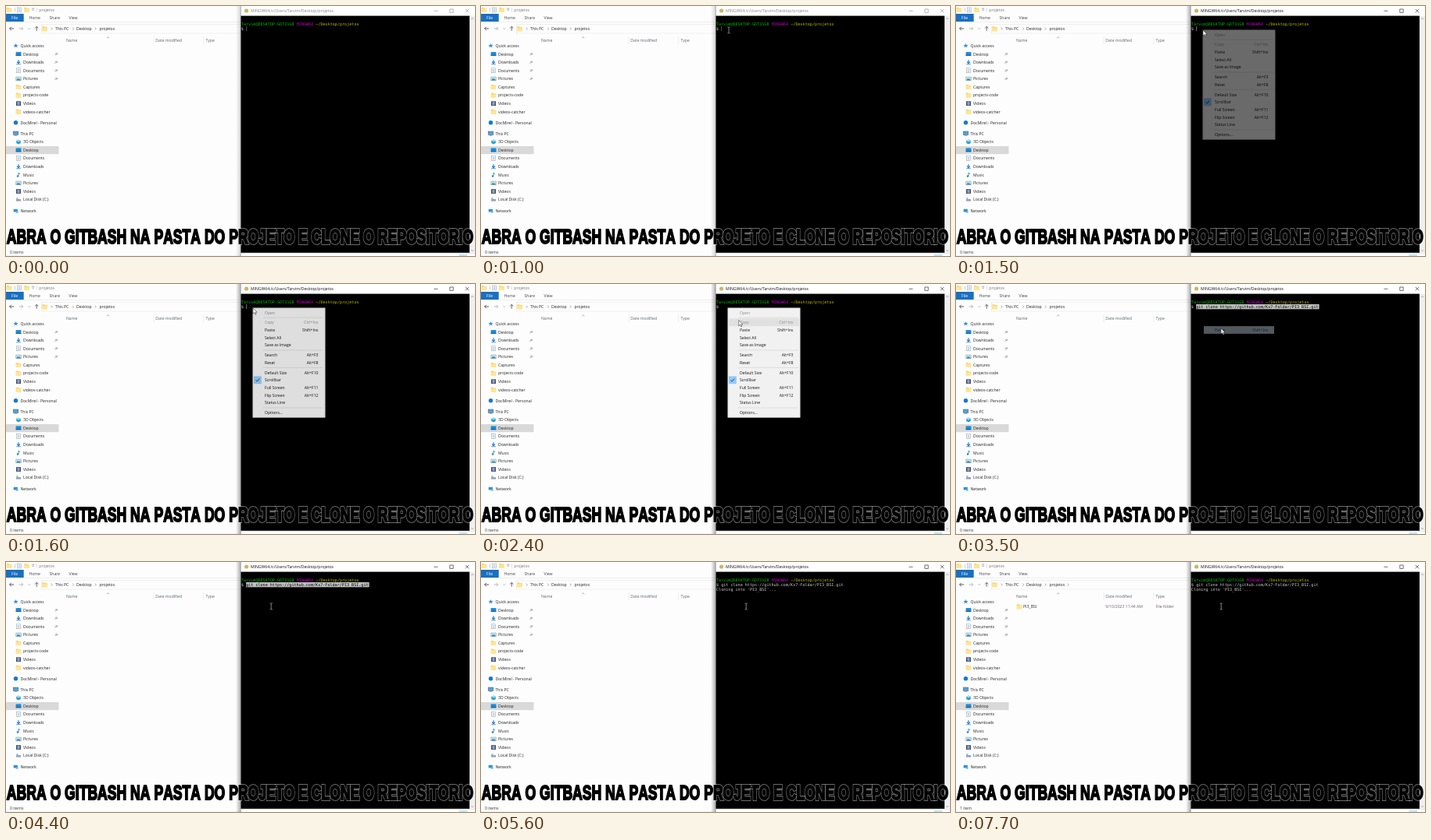
Recreate the animation shown at these times as an HTML page. Size 600 by 321 pixels, loop 8 s.

```html
<!DOCTYPE html>
<html lang="pt">
<head>
<meta charset="utf-8">
<title>Clone do repositorio</title>
<style>
html, body { margin: 0; width: 100%; height: 100%; overflow: hidden; background: #fff; }
svg { display: block; width: 100vw; height: 100vh; }
text { font: 5.1px "Open Sans", "Noto Sans", sans-serif; fill: #222; white-space: pre; }
.term text { font: 5.108px "DejaVu Sans Mono", "Liberation Mono", monospace; fill: #ccc; }
.caption text {
  font: bold 26.5px "Liberation Sans", Arial, sans-serif; font-kerning: none; fill: #000;
  vector-effect: non-scaling-stroke;
}
</style>
</head>
<body>
<svg id="stage" viewBox="0 0 600 321" preserveAspectRatio="none" xmlns="http://www.w3.org/2000/svg"></svg>
<script>
const LOOP = 8000;
const USER = 'Tarvim';
const COMMAND = 'git clone https://github.com/Kx7-Foldar/PI3_BSI.git';
const COL = 3.075, ROW = 6.15, TERM_X = 301, TERM_Y = 24.6;

const rect = (x, y, w, h, fill, more = '') =>
  `<rect x="${x}" y="${y}" width="${w}" height="${h}" fill="${fill}" ${more}/>`;
const line = (d, color = '#555', w = 0.7, more = '') =>
  `<path d="${d}" fill="none" stroke="${color}" stroke-width="${w}" ${more}/>`;
const shape = (d, fill) => `<path d="${d}" fill="${fill}"/>`;
const dot = (x, y, r, fill) => `<circle cx="${x}" cy="${y}" r="${r}" fill="${fill}"/>`;
// Text centred vertically on y
const label = (x, y, s, fill = '#222', more = '') =>
  `<text x="${x}" y="${y + 1.8}" style="fill:${fill}" ${more}>${s}</text>`;
const group = (id, body) => `<g id="${id}">${body}</g>`;

const chevron = (x, y) => line(`M${x - 0.8} ${y - 1.6}l1.6 1.6l-1.6 1.6`, '#777', 0.6);

// Small icons, centred on x, y
const icons = {
  folder: (x, y) => shape(`M${x - 3.2} ${y - 3}h2.6l.8 .9h3v5.1h-6.4z`, '#f7d36b') +
    rect(x - 3.2, y - 1.4, 6.4, 4.4, '#ffe594'),
  star: (x, y) => shape(`M${x} ${y - 3}l.9 2h2.2l-1.7 1.4l.7 2.2l-2.1-1.3l-2.1 1.3l.7-2.2l-1.7-1.4h2.2z`, '#3c8fdc'),
  desk: (x, y) => rect(x - 3.4, y - 2.6, 6.8, 4.8, '#1a8bd8') + rect(x - 3.4, y + 1.2, 6.8, 1, '#0b5d9e'),
  down: (x, y) => line(`M${x} ${y - 3}v4.4m-2-2l2 2l2-2`, '#1f7fd0', 1.2) + rect(x - 2.8, y + 2.2, 5.6, 0.8, '#1f7fd0'),
  doc: (x, y) => rect(x - 2.3, y - 3, 4.6, 6, '#fff', 'stroke="#8a98a5" stroke-width=".5"') +
    line(`M${x - 1.3} ${y - 1.2}h2.6m-2.6 1.3h2.6m-2.6 1.3h2.6`, '#5a94c4', 0.5),
  pic: (x, y) => rect(x - 3.2, y - 2.4, 6.4, 4.8, '#bfe2f7', 'stroke="#8a98a5" stroke-width=".5"') +
    shape(`M${x - 2.8} ${y + 2}l2-2.6l1.4 1.2l.9-.8l1.4 2.2z`, '#3c8b9b'),
  film: (x, y) => rect(x - 3, y - 2.9, 6, 5.8, '#4b4858') + rect(x - 1.6, y - 2.2, 3.2, 4.4, '#7fa7d8'),
  mark: (x, y) => dot(x, y, 2.7, '#1479cf'),
  pc: (x, y) => rect(x - 3.3, y - 2.7, 6.6, 4.4, '#4da5dc', 'stroke="#555" stroke-width=".5"') +
    rect(x - 1.7, y + 2.1, 3.4, 0.7, '#666'),
  cube: (x, y) => shape(`M${x} ${y - 3}l2.8 1.5v3l-2.8 1.5l-2.8-1.5v-3z`, '#2a9fd0') +
    shape(`M${x} ${y - 3}l2.8 1.5l-2.8 1.5l-2.8-1.5z`, '#9adfec'),
  note: (x, y) => line(`M${x} ${y + 1.6}v-4.4q.4 1.4 2 1.8`, '#1f7fd0', 0.8) + dot(x - 1, y + 1.7, 1.2, '#1f7fd0'),
  disk: (x, y) => rect(x - 3, y - 0.6, 6, 2.6, '#9aa3ab') + rect(x - 2.6, y - 2.2, 2, 1.2, '#2b9be4'),
  net: (x, y) => rect(x - 2.8, y - 2, 5.2, 3.6, '#2f8fd6') + dot(x + 1.6, y + 1.4, 1.5, '#57b6e8')
};

// indent (0 root, 1 child), y, icon, text, pinned
const tree = [
  [0, 51, 'star', 'Quick access'],
  [1, 61.7, 'desk', 'Desktop', 1], [1, 72.2, 'down', 'Downloads', 1],
  [1, 82.8, 'doc', 'Documents', 1], [1, 93.4, 'pic', 'Pictures', 1],
  [1, 104, 'folder', 'Captures'], [1, 114.6, 'folder', 'projects-code'],
  [1, 125.2, 'film', 'Videos'], [1, 135.7, 'folder', 'videos-catcher'],
  [0, 149.7, 'mark', 'DocMirel - Personal'],
  [0, 163.7, 'pc', 'This PC'],
  [1, 174.4, 'cube', '3D Objects'], [1, 185, 'desk', 'Desktop'],
  [1, 195.6, 'doc', 'Documents'], [1, 206.2, 'down', 'Downloads'],
  [1, 216.8, 'note', 'Music'], [1, 227.4, 'pic', 'Pictures'],
  [1, 238, 'film', 'Videos'], [1, 248.6, 'disk', 'Local Disk (C:)'],
  [0, 262.8, 'net', 'Network']
];

const treeRow = ([level, y, icon, text, pinned]) =>
  icons[icon](level ? 16 : 12.5, y) + label(level ? 22 : 18.5, y, text) +
  (pinned ? line(`M62.4 ${y + 1.6}l1.5-1.5m-.8-1.3l2 2m-.6-2.6l1.4 1.4l-1.5 1`, '#777', 0.7) : '');

function explorer() {
  return rect(0, 0, 300, 321, '#fdfdfd') +
    icons.folder(4, 5) + line('M11.5 2.5v5', '#999', 0.5) +
    icons.doc(17, 5) + icons.folder(26.5, 5) +
    line('M33.3 4.5l1.4 1.4l1.4-1.4M33.3 3.2h2.8', '#666', 0.6) + line('M39.3 2.5v5', '#aaa', 0.4) +
    label(42.3, 5.2, 'projetos', '#777') +
    rect(0, 10, 22.7, 10, '#1a6fc0') + label(7, 14.8, 'File', '#fff') +
    label(29.5, 14.8, 'Home', '#444') + label(55.5, 14.8, 'Share', '#444') + label(80.5, 14.8, 'View', '#444') +
    line('M0 20.5H300', '#e4e4e4', 0.6) +
    line('M10 29H4.6m2.2-2.2l-2.2 2.2l2.2 2.2', '#333', 0.8) +
    line('M16.5 29h5.2m-2.2-2.2l2.2 2.2l-2.2 2.2', '#aaa', 0.8) +
    line('M28.4 28.3l1.4 1.4l1.4-1.4', '#888', 0.6) +
    line('M39.2 31.8v-5.4m-2.1 2.1l2.1-2.1l2.1 2.1', '#444', 0.8) +
    rect(45.5, 23.5, 255, 11.5, 'none', 'stroke="#e0e0e0" stroke-width=".5"') +
    icons.folder(49.5, 29.2) + chevron(58.5, 29.2) +
    label(63, 29.2, 'This PC') + chevron(86, 29.2) +
    label(90, 29.2, 'Desktop') + chevron(114.5, 29.2) + label(119.5, 29.2, 'projetos') +
    line('M189.2 39v10M252.8 39v10', '#e2e2e2', 0.6) +
    line('M129.2 41.2l1.4-1.4l1.4 1.4', '#666', 0.6) +
    label(77, 44.4, 'Name', '#5a6470') + label(191.3, 44.4, 'Date modified', '#5a6470') + label(255.5, 44.4, 'Type', '#5a6470') +
    rect(0, 180, 67.5, 10.2, '#d9d9d9') +
    tree.map(treeRow).join('') +
    group('crumb', chevron(143.5, 29.2)) +
    group('cloned', icons.folder(81, 57.3) + label(86, 57.3, 'PI3_BSI') +
      label(191.3, 57.3, '9/10/2023 11:44 AM', '#666') + label(255.5, 57.3, 'File folder', '#666')) +
    '<text id="status" x="5" y="317.8" style="fill:#333"></text>' +
    line('M0 320.6H300', '#e4e4e4', 0.6);
}

const termText = (col, row, s, fill = '#ccc') =>
  `<text x="${TERM_X + col * COL}" y="${TERM_Y + row * ROW}" style="fill:${fill}">${s}</text>`;

function terminal() {
  return '<linearGradient id="shade"><stop stop-opacity="0"/><stop offset="1" stop-opacity=".3"/></linearGradient>' +
    rect(294, 0, 6, 321, 'url(#shade)', 'id="shadow"') +
    rect(300, 0, 300, 321, '#fff') +
    dot(307.6, 6, 2.6, '#c9b56a') +
    group('titlebar', label(313, 6, `MINGW64:/c/Users/${USER}/Desktop/projetos`, '#111') +
      line('M547.5 6.3h5M567.8 4h4.4v4.4h-4.4zM587.8 3.9l4.5 4.5m0-4.5l-4.5 4.5', '#111', 0.6)) +
    rect(300.3, 12.6, 292.7, 304.2, '#000') +
    rect(593, 12.6, 7, 304.2, '#f0f0f0') +
    line('M595.2 17l1.5-1.5l1.5 1.5M595.2 313.3l1.5 1.5l1.5-1.5', '#777', 0.6) +
    line('M300.3 0V321', '#777', 0.6) + line('M300 317.6H600', '#d4d4d4', 0.6) +
    rect(579.5, 318.8, 10.5, 2.2, '#c4e4f5') +
    '<g class="term">' +
    termText(0, 0, `${USER}@DESKTOP-GDT31G8`, '#00b800') +
    termText(23, 0, 'MINGW64', '#c000c0') +
    termText(31, 0, '~/Desktop/projetos', '#bcbc00') +
    termText(0, 1, '$') +
    group('picked', rect(TERM_X + 2 * COL, 26, COMMAND.length * COL, 6.3, '#bfbfbf') + termText(2, 1, COMMAND, '#000')) +
    group('typed', termText(2, 1, COMMAND)) +
    group('cloning', termText(0, 2, "Cloning into 'PI3_BSI'...")) +
    rect(0.3, 0, 0.7, 6.2, '#aaa', 'id="caret"') + '</g>';
}

const menuItems = [
  [36.8, 'Open', '', 1], [49.3, 'Copy', 'Ctrl+Ins', 1], [59, 'Paste', 'Shift+Ins'],
  [68.8, 'Select All'], [78.5, 'Save as Image'],
  [91.2, 'Search', 'Alt+F3'], [101, 'Reset', 'Alt+F8'],
  [113.8, 'Default Size', 'Alt+F10'], [123.5, 'Scrollbar'],
  [133.2, 'Full Screen', 'Alt+F11'], [142.8, 'Flip Screen', 'Alt+F12'],
  [152.6, 'Status Line'], [165.4, 'Options...']
];

const menuRow = ([y, text, keys = '', off]) => {
  const color = off ? '#8c8c8c' : '#111';
  return label(331, y, text, color) + label(399.5, y, keys, color, 'text-anchor="end"');
};

function menu() {
  return group('menu',
    rect(315.8, 30.8, 92.4, 140.6, '#f1f1f1', 'stroke="#b4b4b4" stroke-width=".6"') +
    rect(317, 0, 90, 9.8, '#91c9f7', 'id="hover"') +
    [43.2, 85, 107.4, 159].map(y => line(`M329 ${y}H406`, '#d0d0d0', 0.6)).join('') +
    rect(317, 118.4, 9.8, 9.8, '#91c9f7') + line('M319.6 123.4l1.6 1.7l3-3.6', '#222', 0.8) +
    menuItems.map(menuRow).join('')) +
    group('chosen', rect(317, 54.1, 90, 9.8, '#a5b0ba') +
      label(331, 59, 'Paste', '#0c3f78') + label(399.5, 59, 'Shift+Ins', '#0c3f78', 'text-anchor="end"'));
}

// Condensed heavy lettering: a thin pale rim under a black face
function caption() {
  const words = 'ABRA O GITBASH NA PASTA DO PROJETO E CLONE O REPOSITORIO';
  const layer = style => `<text ${style}>${words}</text>`;
  return '<g class="caption" transform="translate(.8 304.9) scale(.664 1)">' +
    layer('stroke="#fff" stroke-opacity=".42" stroke-width="3.4"') +
    layer('stroke="#000" stroke-width="1.6"') + '</g>' +
    line('M346.3 286.5v3', '#bbb', 0.7);
}

const pointers =
  group('arrow', '<path d="M0 0v7.2l1.7-1.6l1.2 2.7l1.2-.5l-1.2-2.6h2.3z" fill="#fff" stroke="#000" stroke-width=".45"/>') +
  group('beam', line('M-1.6-4q1.3 0 1.6 .6q.3-.6 1.6-.6M0-3.4v6.8M-1.6 4q1.3 0 1.6-.6q.3 .6 1.6 .6', '#ddd', 0.6));

document.getElementById('stage').innerHTML = explorer() + terminal() + menu() + caption() + pointers;

const el = id => document.getElementById(id);
const show = (id, on) => el(id).setAttribute('visibility', on ? 'visible' : 'hidden');
const fade = (id, a) => { show(id, a > 0); el(id).setAttribute('opacity', a); };
const move = (id, x, y) => el(id).setAttribute('transform', `translate(${x} ${y})`);
const clamp = v => Math.min(1, Math.max(0, v));
const within = (t, a, b) => t >= a && t < b;

const FOCUS = 1500, CLICK = 3300, PASTE = 3400, RUN = 5000, DONE = 6200;
const caretOn = [[0, 2200], [2700, 3200], [PASTE, 3900], [4400, 4900], [5100, 5600], [6100, 6600], [7200, 7700]];

function draw(time) {
  const t = Math.floor(time / 100) * 100;

  // The terminal is greyed out until it gets the focus
  const focused = t >= FOCUS;
  fade('titlebar', focused ? 1 : 0.5);
  fade('shadow', focused ? 1 : 0.5);

  show('caret', caretOn.some(([a, b]) => within(t, a, b)));
  el('caret').setAttribute('opacity', focused ? 1 : 0.7);
  const [col, row] = t < PASTE ? [2, 1] : t < RUN ? [2 + COMMAND.length, 1] : [0, 3];
  move('caret', TERM_X + col * COL, 19.8 + row * ROW);
  show('picked', within(t, PASTE, RUN));
  show('typed', t >= RUN);
  show('cloning', t >= RUN);

  const opacity = t < 1600 ? 0.44 : t < 1700 ? 0.92 : 1;
  fade('menu', within(t, FOCUS, CLICK) ? opacity : 0);
  fade('chosen', t >= CLICK ? clamp((3700 - t) / 400) : 0);

  const p = clamp((t - 2100) / 500);
  const x = 316 + 23 * p, y = 31 + 26 * p;
  const item = menuItems[y < 43 ? 0 : y < 54 ? 1 : 2];
  show('hover', p > 0 && within(t, FOCUS, CLICK));
  el('hover').setAttribute('y', item[0] - 4.9);
  el('hover').setAttribute('fill', item[3] ? '#e0e0e0' : '#91c9f7');

  show('arrow', within(t, FOCUS, 3700));
  move('arrow', x, y);
  show('beam', within(t, 800, FOCUS) || t >= 3700);
  if (t < FOCUS) move('beam', 317, 27 + 4 * clamp((t - 800) / 200));
  else move('beam', 339.2, 57);

  show('cloned', t >= DONE);
  show('crumb', t >= 6500);
  el('status').textContent = t >= DONE ? '1 item' : '0 items';
}

const start = performance.now();
function tick() {
  draw((performance.now() - start) % LOOP);
  requestAnimationFrame(tick);
}
tick();
</script>
</body>
</html>
```
